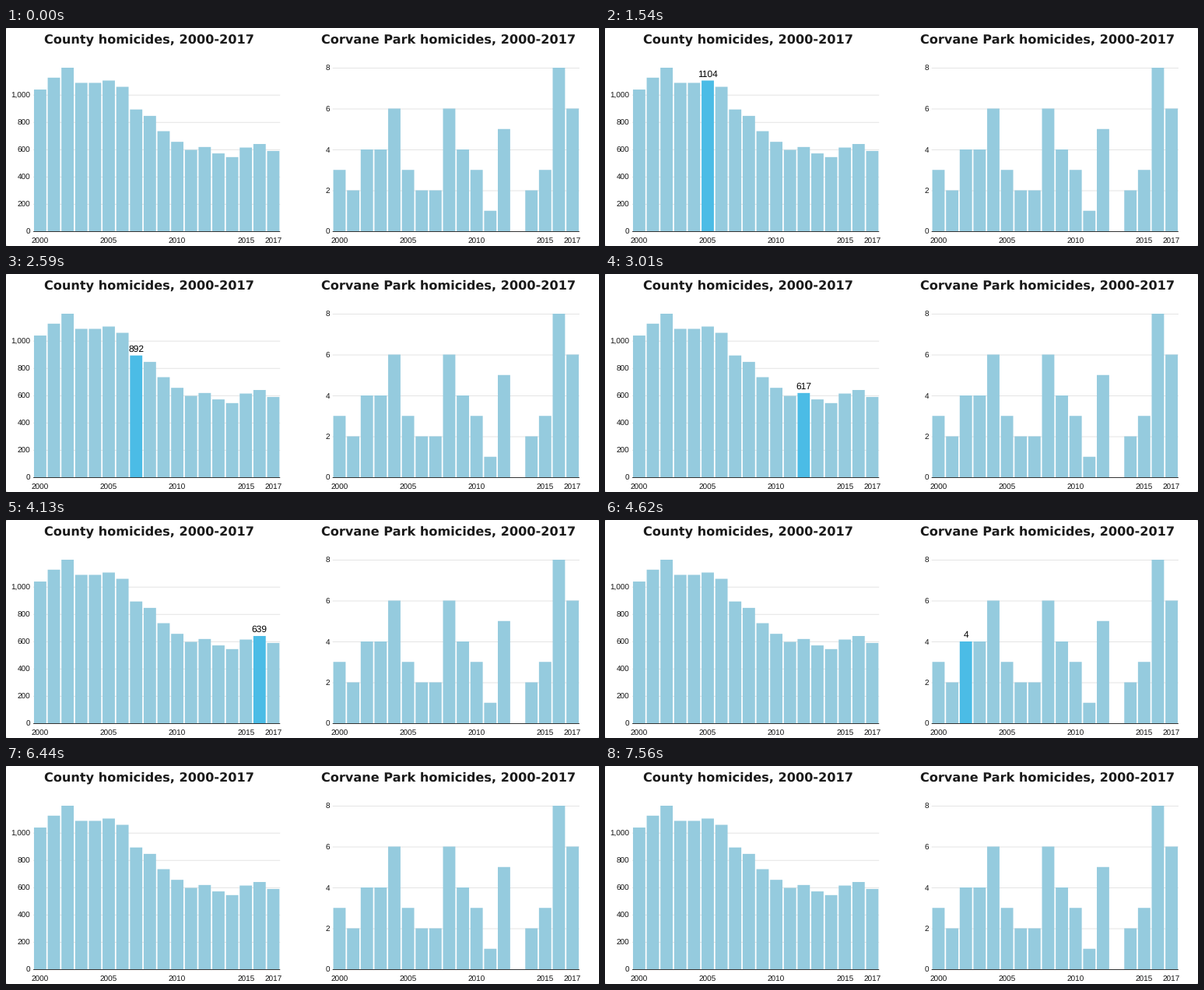
Recreate the animation shown at these times as a matplotlib script. Size 762 by 280 pixels, loop 8050 ms.

```python
import numpy as np
import matplotlib.pyplot as plt
from matplotlib.animation import FuncAnimation
from matplotlib.patches import FancyBboxPatch, Rectangle

W, H, DPI = 762, 280, 64
STEP_MS, LOOP_MS = 70, 8050
PT = 72 / DPI                      # points per pixel

BAR, HOVER = "#95cbde", "#4bbce6"
GRID, AXIS, INK = "#e4e4e4", "#333333", "#111111"
BASE, PLOT_H = 261, 210
COUNT, PITCH = 18, 17.62
BAR_W = 0.9 * PITCH

plt.rcParams["text.hinting"] = "none"
fig = plt.figure(figsize=(W / DPI, H / DPI), dpi=DPI, facecolor="#dcdcdc")
ax = fig.add_axes([0, 0, 1, 1])
ax.set(xlim=(0, W), ylim=(H, 0))
ax.axis("off")
ax.add_patch(FancyBboxPatch((0, 0), W, H, fc="white", ec="none", zorder=0,
                            boxstyle="round,pad=0,rounding_size=3"))


def text(x, y, s, px, ha="center", font="Liberation Sans", **kw):
    return ax.text(x, y, s, fontsize=px * PT, ha=ha, va="baseline",
                   family=font, zorder=5, **{"color": INK, **kw})


def box(x, y, w, h, color, z):
    return ax.add_patch(Rectangle((x, y), w, h, fc=color, ec="none",
                                  zorder=z, snap=False))


class BarChart:
    def __init__(self, title, x0, values, tick_step, pointer):
        self.values, self.pointer = values, pointer
        self.centers = x0 + PITCH * np.arange(COUNT)
        self.tops = BASE - PLOT_H * np.array(values) / max(values)

        left, width = x0 - PITCH / 2, COUNT * PITCH
        text(left + width / 2 - 9.3, 20, title, 16.1, font="DejaVu Sans",
             weight="bold", color="#1a1a1a")
        for v in range(0, max(values) + 1, tick_step):
            y = BASE - PLOT_H * v / max(values)
            text(left - 3.6, y + 4, f"{v:,}", 10, ha="right")
            box(left, y, width, 1, GRID if v else AXIS, 1 if v else 4)
        for i in [*range(0, COUNT, 5), COUNT - 1]:
            text(self.centers[i], 277, str(2000 + i), 10)

        self.bars = [box(x - BAR_W / 2, y, BAR_W, BASE - y, BAR, 2)
                     for x, y in zip(self.centers, self.tops)]
        self.label = text(0, 0, "", 12, color="black")

    def draw(self, tick):
        times, stops = zip(*self.pointer)
        inside = times[0] <= tick <= times[-1]
        active = int(np.rint(np.interp(tick, times, stops))) if inside else None
        for i, bar in enumerate(self.bars):
            bar.set_facecolor(HOVER if i == active else BAR)
        self.label.set_text(str(self.values[active]) if inside else "")
        if inside:
            self.label.set_position((self.centers[active],
                                     self.tops[active] - 4.9))


# pointer: (tick, bar) turning points of the mouse while it is over the chart
charts = [
    BarChart("County homicides, 2000-2017", 43.9,
             [1038, 1125, 1198, 1087, 1087, 1104, 1058, 892, 845,
              733, 655, 596, 617, 570, 543, 613, 639, 588], 200,
             [(22, 5), (25, 2), (27, 2), (31, 4), (35, 8), (36, 8), (38, 6),
              (40, 9), (46, 15), (58, 15), (60, 16)]),
    BarChart("Corvane Park homicides, 2000-2017", 428.5,
             [3, 2, 4, 4, 6, 3, 2, 2, 6, 4, 3, 1, 5, 0, 2, 3, 8, 6], 2,
             [(64, 0), (67, 3), (71, 3), (72, 4), (76, 4)]),
]


def draw(tick):
    for chart in charts:
        chart.draw(tick)
    return []


anim = FuncAnimation(fig, draw, frames=LOOP_MS // STEP_MS, interval=STEP_MS,
                     repeat=True, repeat_delay=0, blit=False)
plt.show()
```
